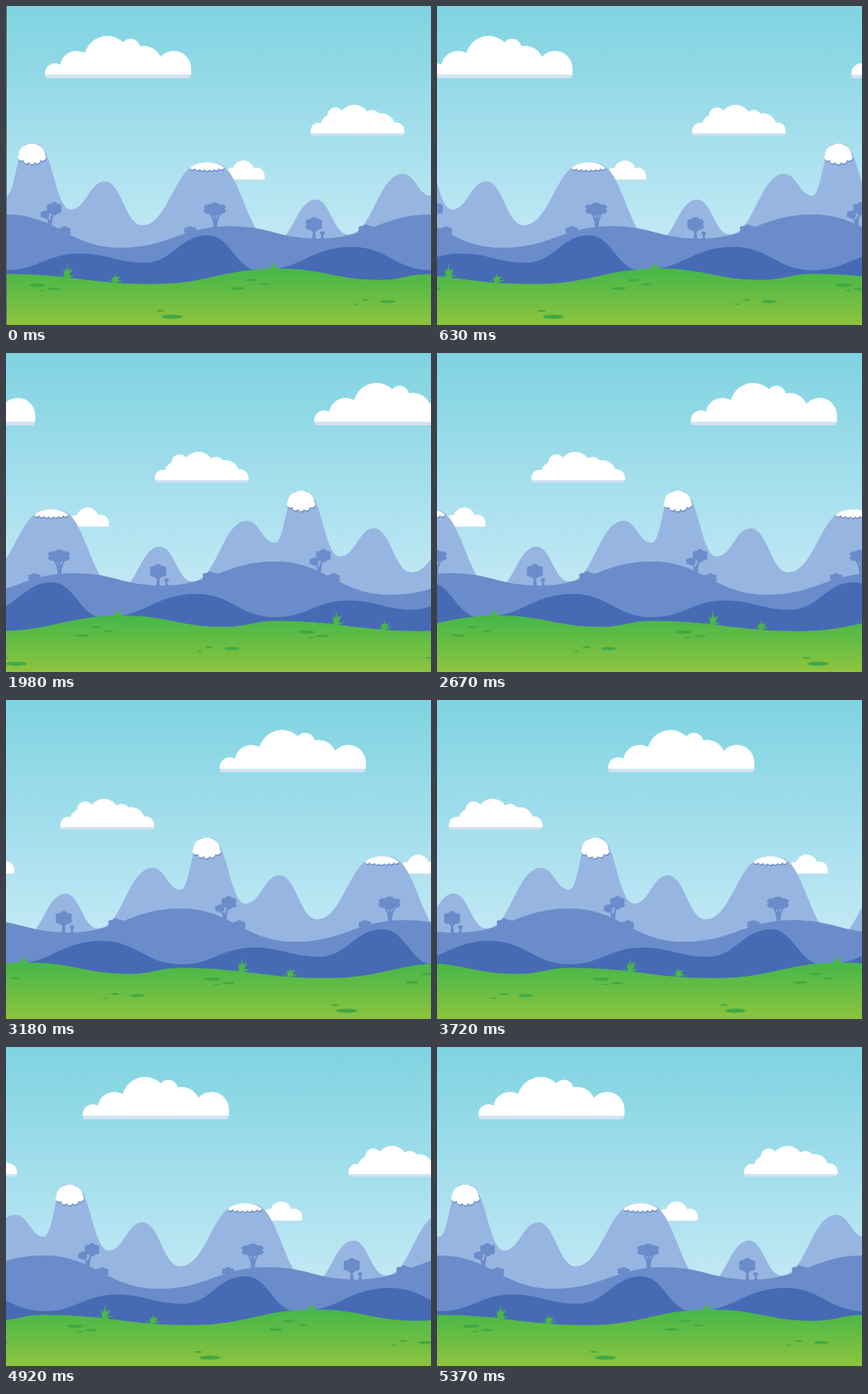
Write an HTML page that moves like this. It is 512 px wide and 384 px high and loops after 5.4 s.

```html
<!DOCTYPE html>
<html lang="en">
<head>
<meta charset="utf-8">
<title>Scrolling hills</title>
<style>
  html, body { margin: 0; width: 100%; height: 100%; overflow: hidden; background: #a5dcea; }
  svg { display: block; width: 100%; height: 100%; }
</style>
</head>
<body>
<svg viewBox="0 0 512 384">
  <defs>
    <linearGradient id="sky" gradientUnits="userSpaceOnUse" x1="0" y1="0" x2="0" y2="280">
      <stop offset="0" stop-color="#7fd3e1"/>
      <stop offset="1" stop-color="#c2e8f5"/>
    </linearGradient>
    <linearGradient id="grass" gradientUnits="userSpaceOnUse" x1="0" y1="318" x2="0" y2="384">
      <stop offset="0" stop-color="#47b749"/>
      <stop offset="1" stop-color="#8dc43e"/>
    </linearGradient>
  </defs>
  <rect width="512" height="384" fill="url(#sky)"/>
  <g id="world"></g>
  <rect id="edge" width="1" height="384" fill="#5b6b72"/>
</svg>
<script>
const LOOP = 5400, STEP = 30, WIDTH = 512;
const FAR = '#97b5e1', MID = '#6b8cca', NEAR = '#476ab5', TUFT = '#4ab848', SPOT = '#41a845';
const byId = id => document.getElementById(id);

const shape = (fill, d) => `<path fill="${fill}" d="${d}"/>`;
const ellipse = (fill, x, y, rx, ry) => `<ellipse fill="${fill}" cx="${x}" cy="${y}" rx="${rx}" ry="${ry}"/>`;
const repeat = (count, make) => Array.from({ length: count }, (_, i) => make(i)).join('');

// A skyline that eases through its crests and valleys, level at each one.
function hills(fill, base, points) {
  let [x, y] = points[0], d = `M-1 ${base}V${y}H0`;
  for (const [nextX, nextY] of points.slice(1)) {
    const pull = (nextX - x) * .45;
    d += `C${x + pull} ${y} ${nextX - pull} ${nextY} ${nextX} ${nextY}`;
    [x, y] = [nextX, nextY];
  }
  return shape(fill, `${d}H${WIDTH + 1}V${base}Z`);
}

// Round-topped arches [x, y, radius] standing on a shaded strip.
function cloud(base, shade, bumps) {
  const floor = base - shade;
  const left = bumps[0][0] - bumps[0][2], [x, , r] = bumps.at(-1);
  const arches = bumps.map(([x, y, r]) => `M${x - r} ${floor}V${y}A${r} ${r} 0 0 1 ${x + r} ${y}V${floor}Z`);
  return shape('#d3e2f2', `M${left} ${floor}H${x + r}L${x + r - 2} ${base}H${left + 1}Z`) + shape('#fff', arches.join(''));
}

// A domed cap whose lower edge drips in scallops.
function snow(left, right, y, dome, inset, sag, drips) {
  const scallop = i => {
    const u = (i + 1) / drips;
    return `A3 3 0 0 1 ${right + (left - right) * u} ${y + sag * Math.sin(Math.PI * u)}`;
  };
  const d = `M${left} ${y}C${left + inset} ${y - dome} ${right - inset} ${y - dome} ${right} ${y}${repeat(drips, scallop)}Z`;
  return `<g transform="translate(.3 1)">${shape(NEAR, d)}</g>` + shape('#fff', d);
}

// A clump of leaves: a core ringed by smaller blobs.
function clump(x, y, rx, ry) {
  return ellipse(MID, x, y, rx * .7, ry * .7) + repeat(6, i => {
    const a = i * Math.PI / 3 - Math.PI / 2;
    return ellipse(MID, x + Math.cos(a) * rx * .62, y + Math.sin(a) * ry * .58, rx * .4, ry * .42);
  });
}

// Branches fan out of one tapering trunk towards the given tips.
const trunk = (x, y, tips) => shape(MID, tips.map(([tipX, tipY]) =>
  `M${x - 2.5} ${y}Q${x - 1} ${(y + tipY) / 2} ${tipX - .8} ${tipY}H${tipX + .8}Q${x + 1.5} ${(y + tipY) / 2} ${x + 2.5} ${y}Z`).join(''));

// Blades arch outwards like a fountain, every other one shorter.
const tuft = (x, y, spread, height) => shape(TUFT, repeat(7, i => {
  const u = i / 3 - 1, size = i % 2 ? 1 : .72;
  const tipX = x + u * spread + 1, tipY = y - height * size * (1 - .7 * u * u);
  const bendY = y - height * .55 * (1 - .4 * u * u);
  return `M${x - 2} ${y}Q${x + u * spread * .35 - 1} ${bendY} ${tipX} ${tipY}Q${x + u * spread * .4 + 1.2} ${bendY + 2} ${x + 2} ${y}Z`;
}));

const spots = points => points.map(([x, y, r]) => ellipse(SPOT, x, y, r, r * .2)).join('');

const layers = [
  cloud(87, 4.2, [[59, 81, 12], [85, 74, 20], [122, 64, 28], [150, 51, 11.5], [166, 70, 22], [202, 75, 21]]) +
  cloud(156, 3, [[376.5, 150, 9.5], [392, 144, 13], [397, 132, 10], [419.5, 138, 19], [441, 135, 10], [452, 146, 17], [469.5, 150.5, 10.5]]) +
  cloud(209.5, .8, [[272, 203, 8], [286, 199, 13], [302, 204, 9.5]]),

  hills(FAR, 300, [[0, 228.5], [25, 166], [37, 166], [78, 245], [119, 211], [164, 264], [236, 189], [252, 189],
    [322, 285], [373, 233], [412, 275], [478, 202], [512, 228.5]]) +
  snow(15, 47.5, 180, 19, 1, 8, 5) + snow(222, 262.5, 194.5, 8.5, 9, 2, 7),

  trunk(53, 266, [[47, 251], [59, 246]]) + clump(58, 244, 9.5, 8) + clump(47, 251, 6, 5) +
  trunk(252, 268, [[244, 247], [252, 244], [260, 247]]) + clump(251.5, 244.5, 14, 8) +
  trunk(371, 282, [[371, 262]]) + clump(371, 263, 10.5, 9) + trunk(381, 282, [[381, 274]]) + clump(381, 273.5, 3, 2.5) +
  clump(70.5, 271, 8, 6) + clump(222, 270, 8, 5) + clump(434, 269, 10, 6) +
  hills(MID, 340, [[0, 251], [138, 291], [270, 265], [376, 280], [512, 251]]),

  hills(NEAR, 345, [[0, 318], [88, 298], [167, 309], [243, 276], [305, 318.5], [417, 290], [512, 318]]),

  hills('url(#grass)', 384, [[0, 322.5], [177, 334.7], [328, 316], [451, 329.7], [512, 322.5]]) +
  spots([[38, 336, 10], [57.5, 340.8, 7.5], [43, 342.5, 4], [186, 367, 4.5], [200, 374, 12.5], [296, 330, 7],
    [279, 340, 8], [312, 335, 5.5], [433, 354, 4.5], [460, 355.8, 9], [421, 359, 3.3]]) +
  tuft(73, 329, 10, 20) + tuft(131, 333, 9, 12) + tuft(321.5, 318.5, 8, 11)
];

// Each layer is followed by its own copy, so the join never shows through another layer.
byId('world').innerHTML = layers.map((content, i) =>
  `<g id="layer${i}">${content}</g><use href="#layer${i}" x="${WIDTH}"/>`).join('');

const start = performance.now();
function draw() {
  const step = Math.floor(((performance.now() - start) % LOOP) / STEP);
  byId('world').setAttribute('transform', `translate(${-step * STEP / LOOP * WIDTH} 0)`);
  byId('edge').setAttribute('visibility', step === 0 ? 'visible' : 'hidden');
  requestAnimationFrame(draw);
}
draw();
</script>
</body>
</html>
```
